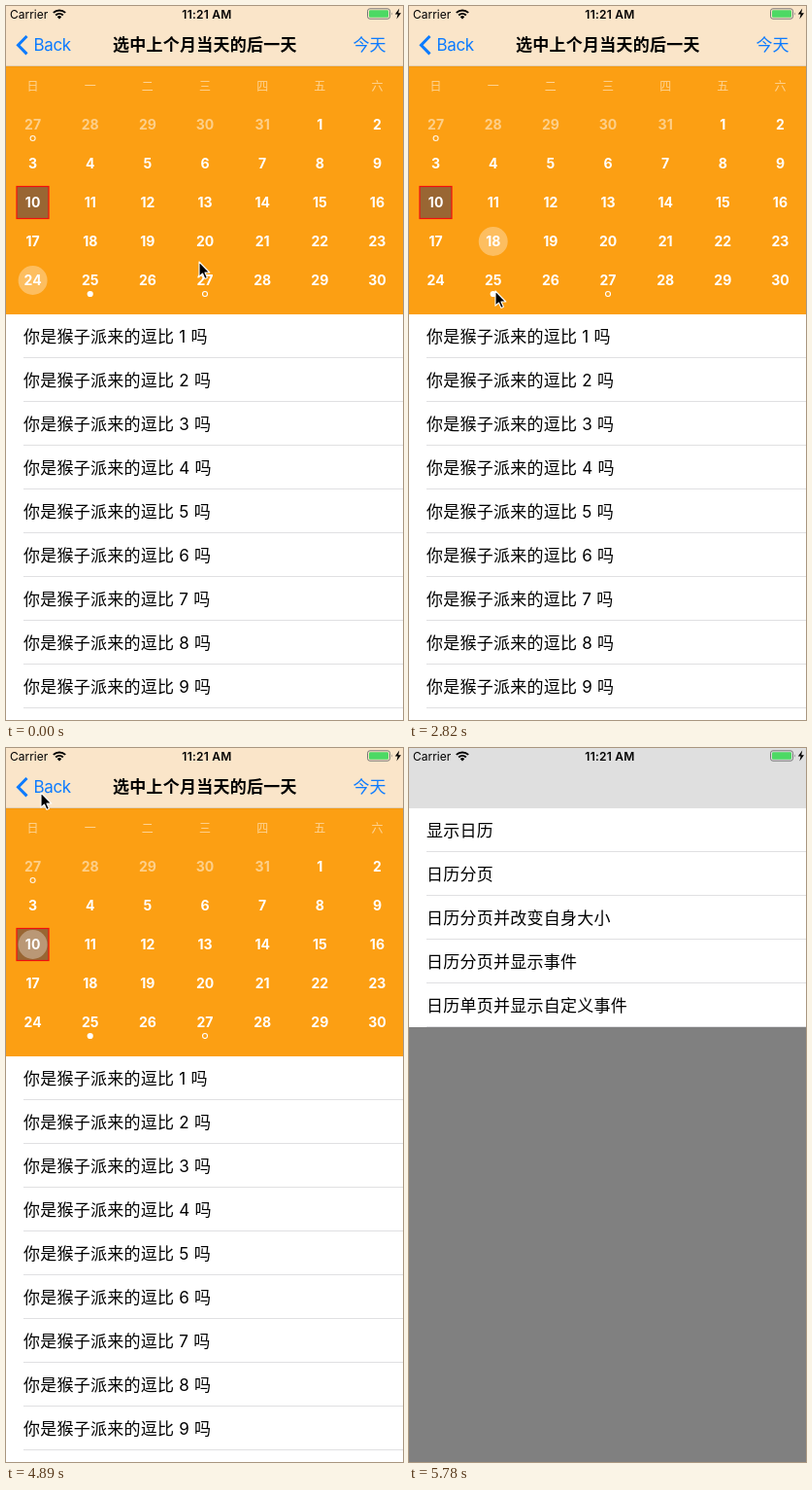
Write an HTML page that moves like this. It is 409 by 734 pixels and loops after 6720 ms.

```html
<!DOCTYPE html>
<html lang="zh-CN">
<head>
<meta charset="utf-8">
<style>
  html, body { margin: 0; width: 100%; height: 100%; overflow: hidden; background: #fff; }
  svg { display: block; width: 100vw; height: 100vh; }
  text {
    font: 17px Inter, "Noto Sans CJK SC", "Noto Sans CJK", sans-serif;
    letter-spacing: .25px; white-space: pre;
  }
  .mid { text-anchor: middle; }
  .week { font-size: 12px; fill: #fff; opacity: .55; letter-spacing: 0; }
  .day { font-size: 14px; font-weight: 700; fill: #fff; letter-spacing: 0; }
  .dim { opacity: .5; }
  .blue { fill: #0c7bff; }
  .ring { fill: none; stroke: #fff; stroke-width: 1.1; }
  .line { fill: #e0e0e2; }
  .status { font-size: 12px; letter-spacing: 0; }
</style>
</head>
<body>
<svg viewBox="0 0 409 734" preserveAspectRatio="none">
  <defs>
    <linearGradient id="barFill" gradientUnits="userSpaceOnUse" x1="-48" x2="48" y1="0" y2="0">
      <stop offset="0" stop-color="#dfdfdf"/>
      <stop offset="1" stop-color="#fae5c9"/>
    </linearGradient>
    <linearGradient id="edge">
      <stop offset="0" stop-opacity="0"/>
      <stop offset="1" stop-opacity=".22"/>
    </linearGradient>
    <clipPath id="titleClip"><rect width="357" height="62"/></clipPath>
  </defs>

  <rect width="409" height="734" fill="#808080"/>
  <g id="menu"><rect x="-2" y="62" width="540" height="225" fill="#fff"/></g>
  <rect id="shade" y="62" width="409" height="672"/>

  <g id="page">
    <rect id="shadow" x="-12" y="62" width="10" height="672" fill="url(#edge)"/>
    <rect x="-2" y="62" width="414" height="672" fill="#fff"/>
    <rect x="-2" y="62" width="414" height="255" fill="#fc9f13"/>
    <rect x="11" y="185.5" width="33" height="33" fill="#963" stroke="#f00f0f" stroke-width="1.2"/>
    <circle id="pick" r="15" fill="#fff" opacity=".33"/>
    <g id="days"></g>
    <circle class="ring dim" cx="27.6" cy="136" r="2.5" style="opacity:.9"/>
    <circle cx="86.7" cy="296" r="3.1" fill="#fff"/>
    <circle class="ring" cx="205" cy="296" r="2.5"/>
    <g id="rows"></g>
  </g>

  <rect id="bar" width="409" height="62" fill="url(#barFill)"/>
  <rect id="hair" y="61.5" width="414" height=".7" opacity=".2"/>
  <path id="chevron" d="M21.5 31 L12.5 40.2 L21.5 49.4" fill="none" stroke="#0c7bff" stroke-width="3"/>
  <text id="back" class="blue" x="28.5" y="46" style="letter-spacing:-.35px">Back</text>
  <g clip-path="url(#titleClip)">
    <text id="title" x="110" y="46" font-weight="600" style="font-weight:600">选中上个月当天的后一天</text>
  </g>
  <text id="today" class="blue" x="357.5" y="46" style="letter-spacing:0">今天</text>

  <text class="status" x="4" y="12.7">Carrier</text>
  <g fill="none" stroke="#000" stroke-width="2">
    <path d="M48.8 6.9 A9 9 0 0 1 61.2 6.9"/>
    <path d="M51.2 9.4 A5.6 5.6 0 0 1 58.8 9.4"/>
  </g>
  <path d="M55 13.4 L52.8 11.2 A3.1 3.1 0 0 1 57.2 11.2 Z"/>
  <text class="status mid" x="207" y="12.7" style="font-weight:600;letter-spacing:.25px">11:21 AM</text>
  <rect x="372.5" y="2.8" width="23" height="10.4" rx="2.4" fill="none" stroke="#777"/>
  <rect x="374" y="4.3" width="20" height="7.4" rx="1.2" fill="#4cd964"/>
  <path d="M397 6.2 q1.6 1.8 0 3.6z" fill="#777"/>
  <path d="M405.2 2.6 L400.8 8.6 H403.6 L402.4 13.4 L407 7.2 H404.2 Z"/>

  <path id="cursor" d="M0 0 V15.2 L3.5 12 L5.9 17.4 L8.4 16.3 L6 11 H10.8 Z" stroke="#fff" stroke-width="1.1" stroke-linejoin="round"/>
</svg>
<script>
const $ = id => document.getElementById(id);
const colX = c => 27.6 + 59.14 * c;
const rowY = r => 122 + 40 * r;

function add(parent, tag, attrs, label) {
  const el = document.createElementNS('http://www.w3.org/2000/svg', tag);
  for (const k in attrs) el.setAttribute(k, attrs[k]);
  if (label !== undefined) el.textContent = label;
  $(parent).appendChild(el);
}

function listRow(parent, label, top, width) {
  add(parent, 'text', { x: 18, y: top + 29 }, label);
  add(parent, 'rect', { class: 'line', x: 18, y: top + 44, width, height: 1 });
}

[...'日一二三四五六'].forEach((w, c) =>
  add('days', 'text', { class: 'week mid', x: colX(c), y: 86.5 }, w));
for (let i = 0; i < 35; i++) {
  const before = i < 5;
  add('days', 'text', {
    class: 'day mid' + (before ? ' dim' : ''), x: colX(i % 7), y: rowY(Math.floor(i / 7)) + 5
  }, before ? 27 + i : i - 4);
}
for (let i = 1; i < 10; i++) listRow('rows', `你是猴子派来的逗比 ${i} 吗`, 272 + 45 * i, 394);
['显示日历', '日历分页', '日历分页并改变自身大小', '日历分页并显示事件', '日历单页并显示自定义事件']
  .forEach((s, i) => listRow('menu', s, 62 + 45 * i, 520));

const LOOP = 6720, TICK = 1000 / 6.75;   // the picture advances in ticks
// tick, x, y
const path = [
  [2, 199, 263], [3, 190, 249], [5, 149, 187], [7, 147, 198], [8, 147, 198],
  [9, 141, 208], [11, 94, 251], [13, 87, 247], [16, 86, 244],
  [17, 85, 252], [19, 89, 293], [21, 165, 289], [23, 219, 280], [25, 214, 277],
  [26, 150, 250], [28, 25, 205], [30, 25, 203], [32, 38, 55], [33, 36, 46],
  [35, 35, 44.5], [36, 95, 161], [37, 150, 255], [38, 185, 310]
];
// first tick, day
const picks = [[0, 24], [7, 12], [15, 18], [23, 27], [30, 10]];

function cursorAt(n) {
  const i = path.findIndex(p => p[0] >= n);
  if (i <= 0) return path[0].slice(1);
  const a = path[i - 1], b = path[i], k = (n - a[0]) / (b[0] - a[0]);
  return [a[1] + (b[1] - a[1]) * k, a[2] + (b[2] - a[2]) * k];
}

const move = (id, x, y = 0) => $(id).setAttribute('transform', `translate(${x} ${y})`);
const fade = (id, o) => $(id).setAttribute('opacity', o);

function draw(t) {
  const n = Math.floor((t + 4) / TICK);

  const gone = n >= 39;
  $('cursor').setAttribute('visibility', gone ? 'hidden' : 'visible');
  if (!gone) move('cursor', ...cursorAt(n));

  const cell = picks.filter(p => p[0] <= n).pop()[1] + 4;
  move('pick', colX(cell % 7), rowY(Math.floor(cell / 7)));

  // page slides off to the right, menu follows at 30 % of the distance
  const p = 1 - Math.exp(-.951 * Math.max(0, n - 34.5) ** 2.326);
  const x = 414 * p, slide = p ** 1.21, left = Math.sqrt(1 - p);
  move('page', x);
  move('hair', x - 2);
  move('menu', -.3 * (414 - x));
  fade('shade', .1 * (1 - p));
  fade('shadow', 1 - p);
  $('barFill').setAttribute('gradientTransform', `translate(${p ? x - 2 + 48 * p ** 8 * (p > .99) : -60})`);

  const pressed = n >= 34 ? .3 : 1;
  fade('chevron', pressed * left);
  fade('back', pressed * left);
  fade('title', left);
  fade('today', left);
  move('back', 51 * slide);
  move('title', 251 * slide);
}

function frame() {
  draw(performance.now() % LOOP);
  requestAnimationFrame(frame);
}
frame();
</script>
</body>
</html>
```
